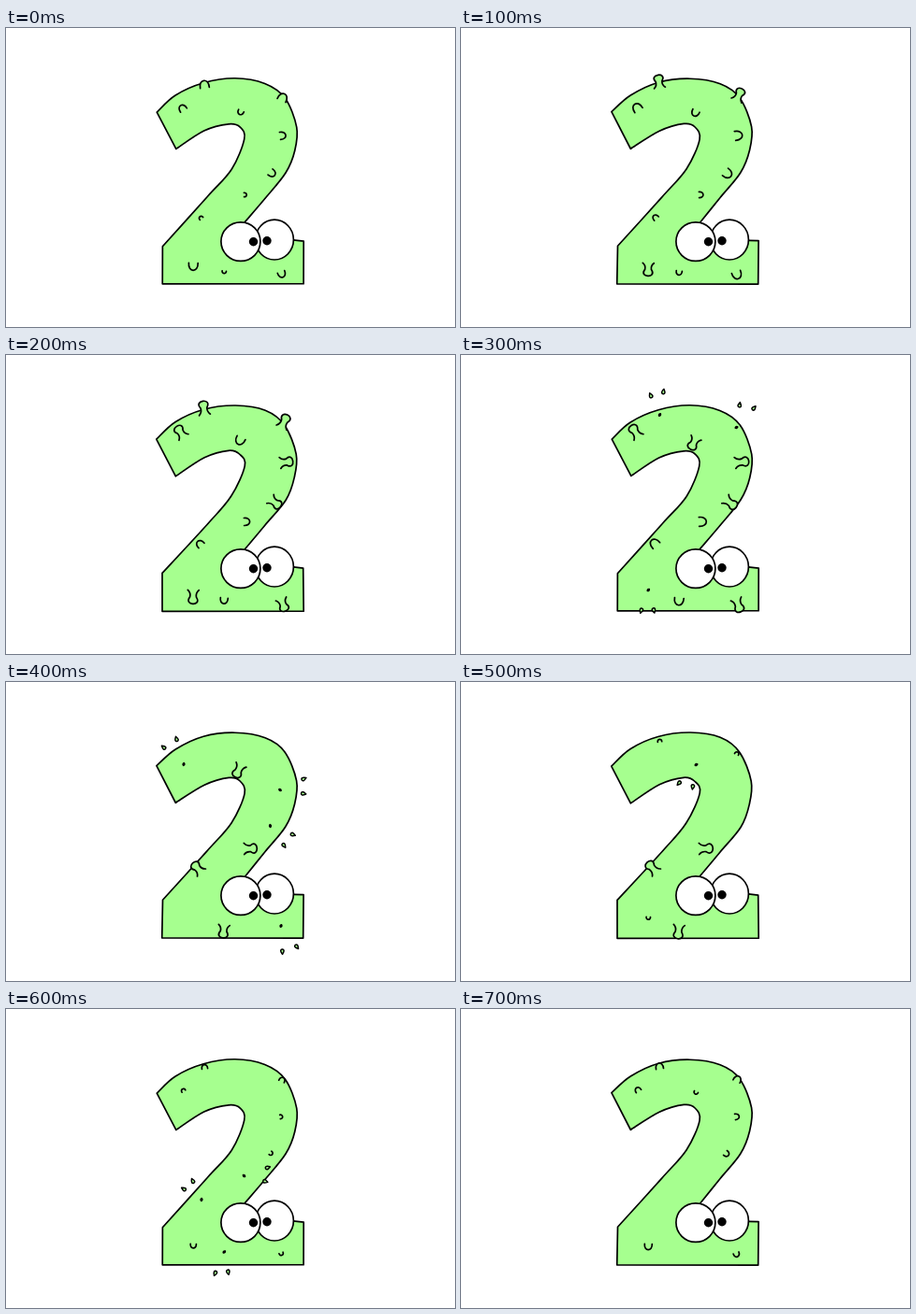
Animation of 480 by 320 pixels, one loop 800 ms. Source, as an HTML page:

```html
<!DOCTYPE html>
<html lang="en">
<head>
<meta charset="utf-8">
<title>Bubbling two</title>
<style>
html, body { margin: 0; width: 100%; height: 100%; overflow: hidden; background: #fff; }
svg { display: block; width: 480px; height: 320px; }
</style>
</head>
<body>
<svg viewBox="0 0 480 320" stroke="#000" stroke-width="1.7" stroke-linecap="round" stroke-linejoin="round">
  <path id="body" fill="#a6ff8f"/>
  <g id="bumps" fill="#a6ff8f"></g>
  <g fill="#fff">
    <ellipse cx="287" cy="226.6" rx="20.4" ry="21.4"/>
    <ellipse cx="250.9" cy="228.6" rx="21" ry="20.8"/>
  </g>
  <g stroke="none">
    <circle cx="264.5" cy="228.7" r="4.7"/>
    <circle cx="279" cy="227.7" r="4.7"/>
  </g>
</svg>
<script>
const STEP = 100, STEPS = 8;
const bodyPath = document.getElementById('body');
const bumpLayer = document.getElementById('bumps');

// Key points of the numeral: back of the curve, foot, then the inner side.
const back = [[161, 90], [181, 72], [211, 58.5], [245, 54], [277, 59.5], [298, 75],
  [310.5, 106], [308.5, 131], [299, 155], [277, 182], [254.5, 209]];
const foot = [[254.5, 227], [307, 227], [318, 228], [318, 274], [167, 274], [167.3, 233.5]];
const inside = [[167.3, 233.5], [215, 181], [241, 151], [255, 119], [250, 106],
  [238, 102.5], [212, 110], [181.5, 129.5]];

// Bumps grouped by the step they burst on: x, y, degrees from upright.
const groups = {
  3: [[212.5, 64, -8], [294.5, 77.5, 25], [200.3, 251.5, 182]],
  4: [[190, 88, -33], [293, 115.5, 82], [282.5, 154, 128], [294, 261, 160]],
  5: [[251.5, 88.5, 206]],
  6: [[254.5, 178.5, 88], [209, 204, -42], [233.3, 260, 186]]
};
const bumps = Object.entries(groups).flatMap(([burst, list]) =>
  list.map(([x, y, turn]) => ({ x, y, turn, burst: +burst })));

// Catmull-Rom spline as cubic segments.
function spline(points) {
  let d = '';
  for (let i = 0; i < points.length - 1; i++) {
    const p = points[i], q = points[i + 1];
    const before = points[i - 1] || p, after = points[i + 2] || q;
    const c1 = p.map((v, j) => v + (q[j] - before[j]) / 6);
    const c2 = q.map((v, j) => v - (after[j] - p[j]) / 6);
    d += `C${c1} ${c2} ${q}`;
  }
  return d;
}

// The outline trembles through three slightly different drawings.
function drawBody(phase) {
  const shaky = points => points.map(([x, y]) => {
    const a = x * 3 + y + phase * 2.1;
    return [x + .3 * Math.sin(a), y + .3 * Math.cos(a)];
  });
  const outer = shaky(back);
  return `M${outer[0]}${spline(outer)}L${shaky(foot).join('L')}${spline(shaky(inside))}Z`;
}

function place(d, x, y, turn, extra = '') {
  return `<path d="${d}" transform="translate(${x} ${y}) rotate(${turn})" ${extra}/>`;
}

function dome(w, h) {
  return `M${-w} 0C${-w * 1.15} ${-h * 1.33} ${w * 1.15} ${-h * 1.33} ${w} 0`;
}

function stalk(w, h) {
  const neck = -h / 2, top = -h * 1.15;
  return `M${-w} 0Q-2.5 ${neck * .4} -3.4 ${neck}C-10.5 ${top} 10.5 ${top} 3.4 ${neck}Q2.5 ${neck * .4} ${w} 0`;
}

// A dark spot stays behind while two drops fan out ahead.
function splash({ x, y, turn }) {
  const spot = place('M0-1.3Q1.6 0 0 1.3Q-1.6 0 0-1.3Z', x, y, turn + 45, 'fill="#000"');
  const drops = [-1, 1].map(side => {
    const angle = turn + side * 17, a = angle * Math.PI / 180;
    const reach = 25 + 3 * Math.sin(x + side * y);
    return place('M0-2.8C1.2-1 1.9 0 1.7 1.2C1.2 2.9-1.2 2.9-1.7 1.2C-1.9 0-1.2-1 0-2.8Z',
      x + reach * Math.sin(a), y - reach * Math.cos(a), angle, 'stroke-width="1.5"');
  });
  return spot + drops.join('');
}

function drawBump(bump, step) {
  const age = (step - bump.burst + STEPS) % STEPS;
  if (age === 0) return splash(bump);
  if (age === 1) return '';
  const d = age < 6
    ? dome(.4 + .9 * age, 1.7 * age - .7)
    : stalk(6, age + 8);
  return place(d, bump.x, bump.y, bump.turn);
}

let shown = -1;
function render(time) {
  const step = Math.floor(time / STEP) % STEPS;
  if (step === shown) return;
  shown = step;
  bodyPath.setAttribute('d', drawBody(step % 3));
  bumpLayer.innerHTML = bumps.map(b => drawBump(b, step)).join('');
}

const start = performance.now();
function tick() {
  render(performance.now() - start);
  requestAnimationFrame(tick);
}
tick();
</script>
</body>
</html>
```
